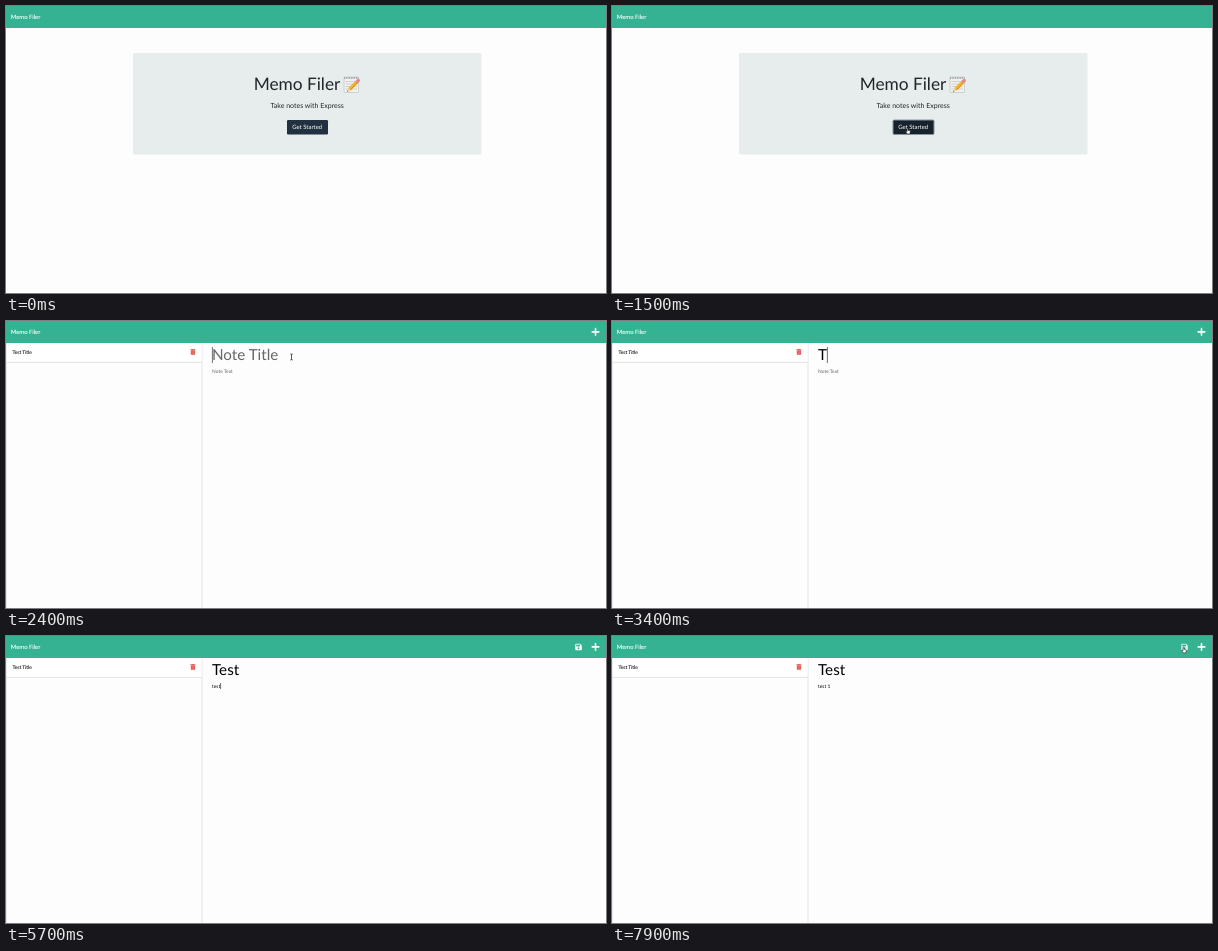
These frames come from a looping animation (600x287 px, 8000 ms). An HTML page:

```html
<!DOCTYPE html>
<html lang="en">
<head>
<meta charset="utf-8">
<title>Memo Filer</title>
<style>
  html, body { margin: 0; width: 100%; height: 100%; overflow: hidden; background: #fefdfe; }
  svg { display: block; width: 600px; height: 287px; }
  text { font-family: Lato, "Open Sans", sans-serif; text-rendering: geometricPrecision; white-space: pre; }
  .middle { text-anchor: middle; }
  .title { font-size: 15.2px; }
  .small { font-size: 4.9px; }
</style>
</head>
<body>
<svg viewBox="0 0 600 287">
  <rect width="600" height="287" fill="#fefdfe"/>
  <rect width="600" height="22" fill="#35b291"/>
  <text x="4.8" y="13.2" font-size="5.9" fill="#fff" stroke="#fff" stroke-width=".1">Memo Filer</text>

  <g id="home">
    <rect x="127" y="47" width="348.5" height="101.5" rx="1.4" fill="#e7ecec"/>
    <text class="middle" x="291" y="84" font-size="17.3" fill="#212529">Memo Filer</text>
    <g id="memo">
      <rect x="338" y="71" width="14.5" height="15.5" rx=".8" fill="#f1f1ee" stroke="#b9bcbc" stroke-width=".6"/>
      <path d="M338 72H352.5" stroke="#8d9294" stroke-width="1.4" stroke-dasharray="1 .7"/>
      <path d="M339.5 75.5H351M339.5 78H351M339.5 80.5H351M339.5 83H351" stroke="#b4c0c6" stroke-width=".6"/>
      <path d="M343.6 83.2L350.8 76" stroke="#f3b52c" stroke-width="3.6"/>
      <path d="M344.3 83.9L351.5 76.7" stroke="#d98d1e" stroke-width="1"/>
      <path d="M350.6 76.2L351.4 75.4" stroke="#aab0b4" stroke-width="3.6"/>
      <path d="M351.4 75.4L352.3 74.5" stroke="#e58a86" stroke-width="3.4" stroke-linecap="round"/>
      <path d="M342.3 81.9L341 85.8L344.9 84.5Z" fill="#ecd0a0"/>
      <path d="M341.5 84.4L341 85.8L342.4 85.3Z" fill="#3a3a3a"/>
    </g>
    <text class="middle" x="301.2" y="102.3" font-size="7" fill="#212529">Take notes with Express</text>
    <rect id="button" x="281" y="114" width="41" height="14.5" rx="1.3"/>
    <text class="middle" x="301.2" y="123.3" font-size="5.95" fill="#fff">Get Started</text>
  </g>

  <g id="notes">
    <path d="M.4 22V287M196 22V287" stroke="#dfe3e7" stroke-width=".9"/>
    <g id="item">
      <rect x=".8" y="22" width="194.8" height="19.3" fill="#fff"/>
      <path d="M.4 41.4H196" stroke="#dadee2" stroke-width=".8"/>
      <text class="small" x="6.4" y="33.4" fill="#212529" stroke="#212529" stroke-width=".12">Test Title</text>
      <path d="M184.4 28.3H186L186.3 27.9H187.6L187.9 28.3H189.4V29.2H184.4ZM184.8 29.5H189.1V33.3Q189.1 33.8 188.6 33.8H185.3Q184.8 33.8 184.8 33.3Z" fill="#e25b50"/>
      <path d="M186 30.2V33M187 30.2V33M188 30.2V33" stroke="#f0a59f" stroke-width=".25"/>
    </g>
    <path d="M586.2 10.9H592.8M589.5 7.6V14.2" stroke="#fff" stroke-width="1.6" stroke-linecap="round"/>
    <g id="save">
      <path d="M570 7.7H574L575.8 9.5V13.5Q575.8 14.2 575.1 14.2H570Q569.3 14.2 569.3 13.5V8.4Q569.3 7.7 570 7.7Z" fill="#fff"/>
      <path d="M570.2 8.6H574V10.4H570.2Z" fill="#35b291"/>
      <circle cx="572.5" cy="12.2" r=".95" fill="#35b291"/>
    </g>
    <text id="title" class="title" x="206" y="39.3"></text>
    <text id="body" class="small" x="206" y="51.6"></text>
    <path id="caret" stroke="#111" stroke-width=".6"/>
  </g>

  <g id="pointer">
    <path id="arrow" d="M0 0V4.4L1 3.5L1.7 5L2.4 4.7L1.7 3.3H3Z" fill="#111" stroke="#fff" stroke-width=".35"/>
    <path id="beam" d="M-1.2 -3Q0 -3 0 -2.2Q0 -3 1.2 -3M0 -2.4V2.4M-1.2 3Q0 3 0 2.2Q0 3 1.2 3" fill="none" stroke="#222" stroke-width=".75"/>
    <path id="hand" d="M-.9 -2.5Q-.4 -3.1 0 -2.5V-.8L1.9 -.4Q2.4 -.2 2.3 .5L1.8 2.9H-.8L-2.2 .7Q-2.1 -.1 -1.3 .3L-.9 .6Z" fill="#fff" stroke="#222" stroke-width=".6" stroke-linejoin="round"/>
  </g>
</svg>
<script>
const LOOP = 8000, STEP = 100;
const el = {};
document.querySelectorAll("[id]").forEach(node => el[node.id] = node);

// time, x, y, shape (no shape: hidden)
const path = [
  [0, 217, 231], [100, 217, 231, "arrow"], [200, 217, 231, "arrow"],
  [500, 268, 182, "arrow"], [700, 328, 112, "arrow"], [900, 350, 77, "arrow"],
  [1100, 312, 110, "arrow"], [1200, 297, 123, "hand"], [1400, 296, 125, "hand"],
  [1600, 296, 125, "hand"], [1700, 295, 112, "beam"], [1900, 289, 52, "beam"],
  [2000, 287.3, 38.5, "beam"], [2300, 285.5, 36, "beam"], [3400, 285.5, 36],
  [4300, 285.5, 37, "beam"], [4500, 291, 55, "beam"], [4600, 291, 56, "beam"],
  [5100, 291, 56], [7000, 391.5, 44.5, "beam"], [7100, 434.5, 62.5, "beam"],
  [7200, 434.5, 62.5, "beam"], [7300, 510, 36, "beam"], [7400, 559, 14, "arrow"],
  [7500, 559, 14, "arrow"], [7700, 571, 13.5, "hand"], [7800, 572, 14, "hand"], [8000, 572, 14, "hand"]
];
const titleSteps = [[0, ""], [3400, "T"], [3600, "Te"], [3900, "Test"]];
const bodySteps = [[0, ""], [5100, "t"], [5300, "te"], [5500, "tes"], [5700, "test"], [6700, "test "], [6800, "test 1"]];
const caretSteps = [[0, ""], [2400, "title"], [2900, ""], [3400, "title"], [4400, ""], [4600, "body"],
  [6200, ""], [6700, "body"], [7300, ""], [7800, "body"], [7900, ""]];

const latest = (steps, t) => steps.findLast(([start]) => start <= t);
const show = (node, on) => node.setAttribute("visibility", on ? "inherit" : "hidden");

function setField(node, value, placeholder) {
  node.textContent = value || placeholder;
  node.setAttribute("fill", value ? "#000" : "#666");
}

function drawCaret(t, title, body) {
  const field = latest(caretSteps, t)[1];
  show(el.caret, field);
  if (!field) return;
  const typed = field === "title" ? title : body;
  const x = 206.4 + (typed ? el[field].getComputedTextLength() : 0);
  el.caret.setAttribute("d", field === "title" ? `M${x} 26V42` : `M${x} 47V53`);
}

function drawPointer(t) {
  const from = latest(path, t);
  const to = path[path.indexOf(from) + 1] || from;
  const k = to === from ? 0 : (t - from[0]) / (to[0] - from[0]);
  const x = from[1] + (to[1] - from[1]) * k;
  const y = from[2] + (to[2] - from[2]) * k;
  el.pointer.setAttribute("transform", `translate(${x} ${y})`);
  for (const shape of ["arrow", "beam", "hand"]) show(el[shape], from[3] === shape);
}

function render(time) {
  const t = Math.floor((time % LOOP) / STEP) * STEP;
  const title = latest(titleSteps, t)[1], body = latest(bodySteps, t)[1];
  show(el.home, t < 1600);
  show(el.notes, t >= 1600);
  show(el.item, t >= 1700);
  show(el.save, t >= 5200);
  el.save.setAttribute("opacity", t >= 7700 ? .85 : 1);
  el.button.setAttribute("fill", t < 1200 ? "#22313f" : "#18222d");
  el.button.setAttribute("stroke", t < 1400 ? "none" : "#8795a3");
  setField(el.title, title, "Note Title");
  setField(el.body, body, "Note Text");
  drawCaret(t, title, body);
  drawPointer(t);
}

const start = performance.now();
function tick() {
  render(performance.now() - start);
  requestAnimationFrame(tick);
}
tick();
</script>
</body>
</html>
```
